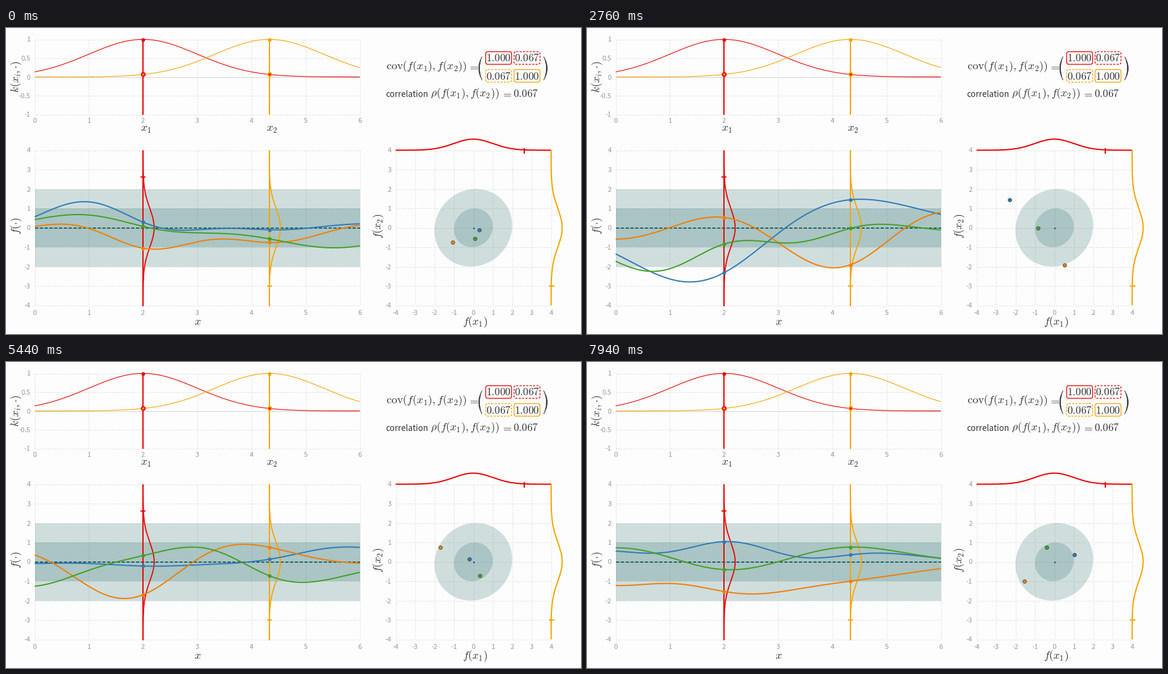
A matplotlib script for the animation above (8000 ms loop, 932x497 px).

```python
import numpy as np
import matplotlib.pyplot as plt
from matplotlib.animation import FuncAnimation
from matplotlib.patches import FancyBboxPatch, PathPatch, Polygon, Rectangle
from matplotlib.path import Path

W, H, DPI = 932, 497, 64
PX = 72 / DPI                      # one pixel in points
FRAMES, INTERVAL = 80, 100
RED, AMBER, TEAL = "#ec0000", "#f6a400", "#17625f"
BLUE, ORANGE, GREEN = "#3079b7", "#f07f08", "#449f26"
MEAN, INK, TICK, GRID = "#1f6067", "#333333", "#999999", "#dedede"
X1, X2 = 2.0, 4.33
RHO = 0.067
UNIT = 31.5

plt.rcParams["mathtext.fontset"] = "cm"
plt.rcParams["font.family"] = "Noto Sans CJK JP"


def rbf(a, b, scale=1.0):
    return np.exp(-0.5 * (np.subtract.outer(a, b) / scale) ** 2)


# ---- Gaussian process paths, smooth in x and in time ----
# Each key pose is six heights per path; the kernel fills in the rest.
KNOTS = np.array([.2, 1.1, X1, 3.17, X2, 5.6])
POSE_AT = np.array([0, 19, 34, 43, 54, 67, 79])
PACE = 4.5
BLUE_KEYS = [
    [.81, 1.30, .29, -.07, -.10, .14],
    [.96, .86, .50, .11, 0, .55],
    [1.28, -.20, -1.85, -1.04, -.88, -.29],
    [.86, 2.01, .71, -.09, .34, -.55],
    [-.08, -.10, -.22, -.14, .13, .75],
    [-.11, -.01, -.17, -.52, -2.10, -1.97],
    [.51, .56, 1.04, .35, .36, .30],
]
ORANGE_KEYS = [
    [.14, -.13, -1.05, -.64, -.76, -.08],
    [-.96, -1.50, -.50, .05, -.91, -.54],
    [.51, .79, 1.20, -.65, .48, 1.36],
    [-1.56, 1.12, 2.10, .28, -1.06, -.25],
    [.12, -1.43, -1.70, .40, .75, .01],
    [-.62, -.94, -.90, 1.24, 2.22, 1.29],
    [-1.22, -1.13, -1.53, -1.49, -1.00, -.50],
]
GREEN_KEYS = [
    [.52, .63, .07, -.27, -.57, -1.03],
    [-2.33, -1.42, -.10, -.73, -1.08, -1.08],
    [-.08, -.57, -.18, 1.28, .96, -.34],
    [-.12, .16, .04, -.95, -.23, .28],
    [-1.17, -.34, .32, .69, -.72, -.80],
    [.47, .75, -1.40, -.67, .20, .54],
    [.70, .14, -.40, .14, .76, .34],
]


def spread(xs):
    """Matrix that takes knot heights to heights at xs."""
    return rbf(np.asarray(xs), KNOTS) @ np.linalg.inv(rbf(KNOTS, KNOTS))


def wander(keys, rng):
    """Random smooth walk of the knots that passes through the key poses."""
    steps = np.arange(FRAMES)
    cx = np.linalg.cholesky(rbf(KNOTS, KNOTS))
    ct = np.linalg.cholesky(rbf(steps, steps, PACE) + 1e-6 * np.eye(FRAMES))
    free = cx @ rng.standard_normal((len(KNOTS), FRAMES)) @ ct.T
    pull = np.linalg.solve(rbf(POSE_AT, POSE_AT, PACE),
                           rbf(POSE_AT, steps, PACE))
    return free + (np.transpose(keys) - free[:, POSE_AT]) @ pull


rng = np.random.default_rng(7)
motion = np.array([wander(k, rng)
                   for k in (BLUE_KEYS, ORANGE_KEYS, GREEN_KEYS)])
XS = np.linspace(0, 6, 241)
CURVES = spread(XS) @ motion
SITES = spread([X1, X2]) @ motion

# ---- stage in pixel coordinates, counted at pixel centres ----
fig = plt.figure(figsize=(W / DPI, H / DPI), dpi=DPI, facecolor="#fdfdfd")
ax = fig.add_axes([0, 0, 1, 1])
ax.set_xlim(-.5, W - .5)
ax.set_ylim(H - .5, -.5)
ax.axis("off")


def px(x):
    return 46 + np.asarray(x) * 527 / 6


def ky(v):
    return 79 - 61 * np.asarray(v)


def fy(v):
    return 324 - UNIT * np.asarray(v)


def sx(v):
    return 757 + UNIT * np.asarray(v)


def line(x, y, color, width=2.0, z=3, **kw):
    kw.setdefault("solid_capstyle", "butt")
    return ax.plot(x, y, color=color, lw=width * PX, zorder=z, **kw)[0]


def dot(x, y, r, color, edge="none", ew=0.0, z=6):
    return ax.plot(x, y, "o", ms=2 * r * PX, mfc=color, mec=edge,
                   mew=ew * PX, zorder=z)[0]


def label(x, y, s, size=11, color=TICK, ha="center", va="baseline", rot=0):
    ax.text(x, y, s, fontsize=size * PX, color=color, ha=ha, va=va,
            rotation=rot, zorder=8)


def math(x, y, s, ha="center", va="baseline", rot=0, size=17.8):
    label(x, y, f"${s}$", size, INK, ha, va, rot)


def grid(xs, ys):
    for x in xs:
        line([x, x], [ys[0], ys[-1]], GRID, 1, 1, dashes=(2, 2))
    for y in ys:
        line([xs[0], xs[-1]], [y, y], GRID, 1, 1, dashes=(2, 2))


# kernel panel
levels = np.linspace(1, -1, 5)
grid(px(np.arange(7)), ky(levels))
line([46, 573], [79, 79], "#d6d6d6", 1, 1)
for v in levels:
    label(39, ky(v) + 4, f"{v:g}", ha="right")
for v in range(7):
    label(px(v), 154, str(v))
    label(px(v), 465, str(v))
for site, color, other in ((X1, RED, AMBER), (X2, AMBER, RED)):
    line(px(XS), ky(rbf(XS, site)), color, 1.1)
    line([px(site)] * 2, [18, 140], color, 2, 4)
    dot(px(site), 18, 3, color)
    dot(px(site), ky(RHO), 2.9, other, color, 2)
math(226, 167, "x_1")
math(430, 167, "x_2")
math(16, 79, r"k(x_i,{\cdot})", va="center", rot=90)

# function panel
ticks = np.arange(4, -5, -1)
grid(px(np.arange(7)), fy(ticks))
for v in ticks:
    label(39, fy(v) + 4, str(v), ha="right")
for v in (2, 1):
    ax.add_patch(Rectangle((46, fy(v)), 527, 2 * v * UNIT, fc=TEAL,
                           alpha=.2, lw=0, zorder=2))
line([46, 573], [324, 324], MEAN, 2, 2.5, dashes=(2.6, 1.3),
     dash_capstyle="butt")
us = np.linspace(-4, 4, 161)
bell = 18 * np.exp(-us ** 2 / 2)
for site, color, mark in ((X1, RED, 2.62), (X2, AMBER, -3)):
    c = px(site)
    line([c, c], [198, 451], color)
    line(c + bell, fy(us), color, 1.8)
    line([c - 4, c + 4], [fy(mark)] * 2, color)
math(310, 482, "x")
math(16, 321, r"f({\cdot})", va="center", rot=90)

# joint panel
grid(sx(ticks[::-1]), fy(ticks))
for v in ticks:
    label(624, fy(v) + 4, str(v), ha="right")
    label(sx(v), 465, str(v))
turn = np.linspace(0, 2 * np.pi, 181)
for r in (2, 1):
    a = r * np.cos(turn)
    b = RHO * a + np.sqrt(1 - RHO ** 2) * r * np.sin(turn)
    ax.add_patch(Polygon(np.column_stack([sx(a), fy(b)]), fc=TEAL,
                         alpha=.2, lw=0, zorder=2))
dot(757, 324, 1.4, MEAN, z=4)
line(sx(us), 198 - bell, RED)
line([sx(2.62)] * 2, [194, 203], RED)
line(883 + bell, fy(us), AMBER)
line([879, 888], [fy(-3)] * 2, AMBER)
math(760, 482, "f(x_1)")
math(603, 321, "f(x_2)", va="center", rot=90)

# covariance read-out
math(615, 67, r"\mathrm{cov}(f(x_1),f(x_2))", ha="left", size=18.2)
math(756, 67, "=")
label(615, 111, "correlation", 13.3, INK, ha="left")
math(687, 111, r"\rho(f(x_1),f(x_2))", ha="left")
math(810, 111, "=")
math(842, 111, "0.067", size=17.3)


def paren(tip, bulge):
    """Tall bracket; bulge is the signed offset of its curve."""
    pts = [(tip, 46), (tip + bulge, 65), (tip, 84),
           (tip + bulge * .7, 65), (tip, 46)]
    codes = [Path.MOVETO] + [Path.CURVE3] * 4
    ax.add_patch(PathPatch(Path(pts, codes), fc=INK, ec=INK, lw=.5 * PX,
                           zorder=8))


paren(771, -11)
paren(871, 12)
for row, color in enumerate((RED, AMBER)):
    for col in range(2):
        x, y = 777 + 46 * col, 38 + 29 * row
        same = row == col
        ax.add_patch(FancyBboxPatch(
            (x, y), 42, 20.5, boxstyle="round,pad=0,rounding_size=3.5",
            fc="none", ec=color, lw=1.3 * PX, zorder=7,
            ls="-" if same else (0, (2.6, 1.6))))
        math(x + 21, y + 16, f"{1 if same else RHO:.3f}", size=17.3)

# moving parts
HUES = (BLUE, ORANGE, GREEN)
paths = [line(px(XS), fy(0 * XS), c, 2, 5) for c in HUES]
beads = [dot(px([X1, X2]), fy([0, 0]), 3, c) for c in HUES]
pairs = [dot([757], [324], 2.9, c, "#3c4a4a", .8) for c in HUES]


def draw(i):
    for n in range(3):
        a, b = SITES[n, :, i]
        paths[n].set_ydata(fy(CURVES[n, :, i]))
        beads[n].set_ydata(fy([a, b]))
        pairs[n].set_data([sx(a)], [fy(b)])
    return paths + beads + pairs


anim = FuncAnimation(fig, draw, frames=FRAMES, interval=INTERVAL,
                     init_func=lambda: draw(0), blit=False, repeat=True)
plt.show()
```
